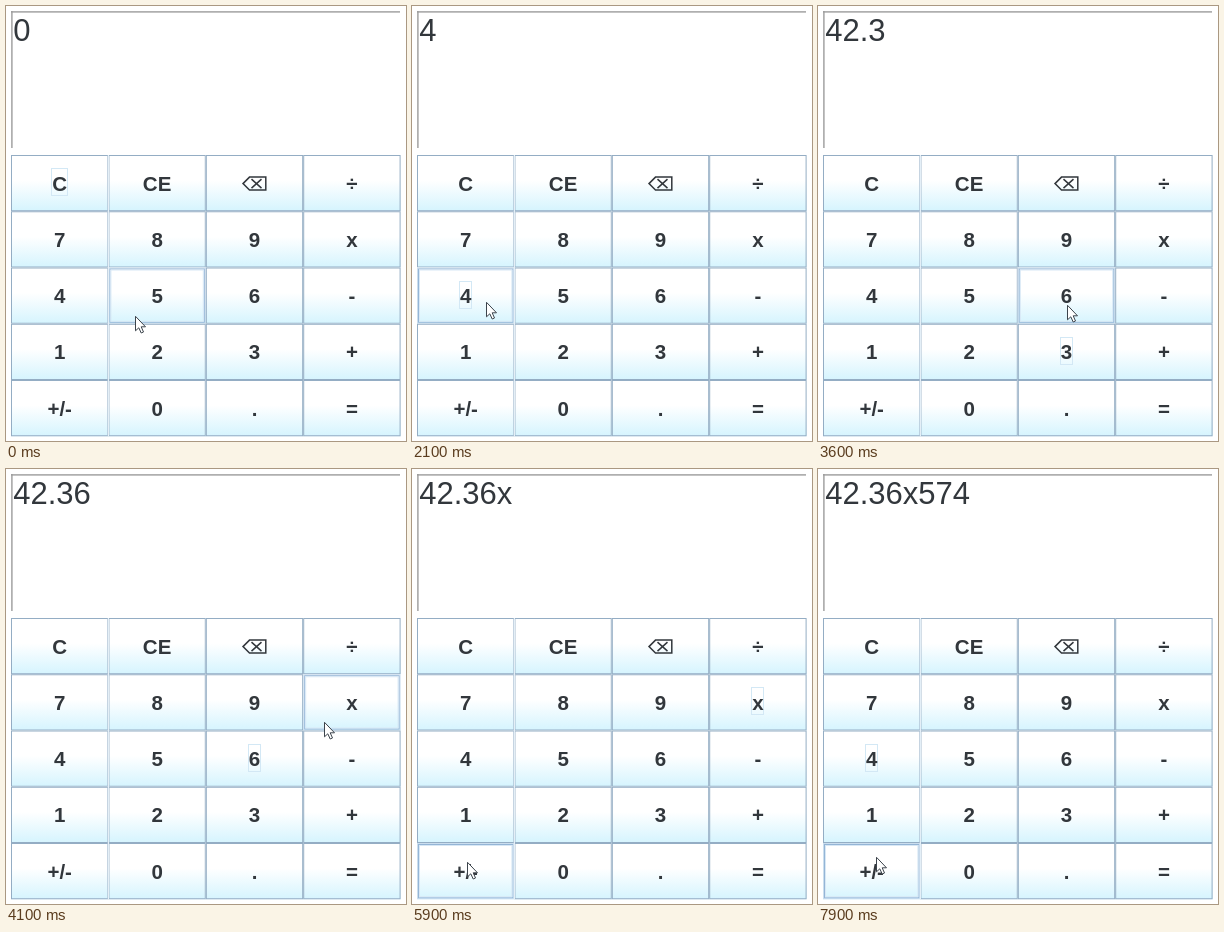
Write an HTML page with a canvas that moves like this. It is 400 px wide and 435 px high and loops after 8000 ms.

```html
<!DOCTYPE html>
<html lang="en">
<head>
<meta charset="utf-8">
<title>Calculator</title>
<style>
  html, body { margin: 0; width: 400px; height: 435px; overflow: hidden; background: #fff; }
  canvas { display: block; }
</style>
</head>
<body>
<canvas id="stage" width="400" height="435"></canvas>
<script>
const ctx = document.getElementById('stage').getContext('2d');
const LOOP = 8000, STEP = 100;
const SANS = '"Liberation Sans", Arial, sans-serif';
const INK = '#32373c';

// Button grid: four equal columns, five equal rows
const LEFT = 5, TOP = 149, W = 97.4, H = 56.25;
const KEYS = 'C CE ⌫ ÷ 7 8 9 x 4 5 6 - 1 2 3 + +/- 0 . ='.split(' ');
const buttons = KEYS.map((label, i) => ({
  label, x: LEFT + W * (i % 4), y: TOP + H * Math.floor(i / 4)
}));

// The pointer reaches a key, presses it one step later unless idle, then leaves
function visit(key, arrive, { stay = STEP, dx = 0, dy = 6, idle = false } = {}) {
  const b = buttons.find(b => b.label === key);
  return { key, arrive, leave: arrive + stay, press: idle ? Infinity : arrive + STEP,
           x: b.x + W / 2 + dx, y: b.y + H / 2 + dy };
}
const visits = [
  visit('5', 0, { stay: 1400, dx: -22, dy: 20, idle: true }),
  visit('4', 1800, { stay: 300, dx: 20 }),
  visit('2', 2400),
  visit('.', 2800),
  visit('3', 3100),
  visit('6', 3600, { dy: 9 }),
  visit('x', 4300, { stay: 800, dx: -4, dy: 3 }),
  visit('+/-', 5800, { stay: 200, dx: 1, dy: -9, idle: true }),
  visit('5', 6400, { stay: 200 }),
  visit('7', 7100, { dx: 14, dy: -9 }),
  visit('4', 7500, { dx: 8 }),
  visit('+/-', 7900, { dx: 4, dy: -14, idle: true })
];

function pointerAt(t) {
  const i = visits.findLastIndex(v => v.arrive <= t);
  const a = visits[i], b = visits[i + 1];
  if (!b || t <= a.leave) return [Math.round(a.x), Math.round(a.y)];
  const u = (t - a.leave) / (b.arrive - a.leave), k = u * u * (3 - 2 * u);
  return [Math.round(a.x + (b.x - a.x) * k), Math.round(a.y + (b.y - a.y) * k)];
}

function frame(x, y, w, h, color) {
  ctx.strokeStyle = color;
  ctx.lineWidth = 1;
  ctx.strokeRect(x + .5, y + .5, w - 1, h - 1);
}

function trace(points, x, y) {
  ctx.beginPath();
  points.forEach(([px, py]) => ctx.lineTo(x + px, y + py));
  ctx.closePath();
}

function drawDisplay(text) {
  ctx.fillStyle = '#9c9c9c';
  ctx.fillRect(5, 5.2, 389, 1.4);
  ctx.fillRect(5.2, 5, 1.4, 137);
  ctx.fillStyle = INK;
  ctx.font = '31px ' + SANS;
  ctx.textAlign = 'left';
  ctx.fillText(text, 7.2, 35);
}

function drawErase(cx, cy) {
  ctx.strokeStyle = INK;
  ctx.lineWidth = 1.5;
  trace([[-11.5, 0], [-5, -6.5], [11.3, -6.5], [11.3, 6.5], [-5, 6.5]], cx, cy);
  ctx.stroke();
  ctx.beginPath();
  for (const s of [-1, 1]) {
    ctx.moveTo(cx - 3, cy - 4.5 * s);
    ctx.lineTo(cx + 7, cy + 4.5 * s);
  }
  ctx.stroke();
}

function drawButton({ label, x, y }, hover, focus) {
  const fill = ctx.createLinearGradient(0, y, 0, y + H);
  fill.addColorStop(.45, '#fff');
  fill.addColorStop(1, '#d5f4fe');
  ctx.fillStyle = fill;
  ctx.fillRect(x, y, W, H);
  if (hover) {
    frame(x, y, W, H, '#cbdeee');
    frame(x + 1, y + 1, W - 2, H - 2, '#94b5d6');
    frame(x + 2, y + 2, W - 4, H - 4, '#d8e8f5');
  } else {
    frame(x, y, W, H, '#94adc4');
  }

  const cx = x + W / 2, base = y + 35.6;
  ctx.font = 'bold 20.5px ' + SANS;
  ctx.textAlign = 'center';
  if (focus) {
    const fw = Math.round(ctx.measureText(label).width) + 2;
    frame(Math.round(cx - fw / 2), Math.round(base - 22.5), fw, 28, '#d3e8f5');
  }
  if (label === '⌫') return drawErase(cx, base - 7);
  ctx.fillStyle = INK;
  ctx.fillText(label, cx, base);
}

function drawPointer(x, y) {
  trace([[0, 0], [0, 14.5], [3.3, 11.5], [5.7, 16.7], [8, 15.7], [5.7, 10.5], [10, 10.5]], x + .5, y + .3);
  ctx.fillStyle = '#fff';
  ctx.fill();
  ctx.strokeStyle = '#3c444c';
  ctx.lineWidth = 1;
  ctx.stroke();
}

function draw(t) {
  const typed = visits.filter(v => v.press <= t).map(v => v.key);
  const focus = typed.length ? typed[typed.length - 1] : 'C';
  const [px, py] = pointerAt(t);
  ctx.fillStyle = '#fff';
  ctx.fillRect(0, 0, 400, 435);
  drawDisplay(typed.join('') || '0');
  for (const b of buttons) {
    const hover = px >= b.x && px < b.x + W && py >= b.y && py < b.y + H;
    drawButton(b, hover, b.label === focus);
  }
  // Pale gap after the first column
  ctx.fillStyle = '#e4eff7';
  ctx.fillRect(LEFT + W - .6, TOP, 1.2, H * 5);
  drawPointer(px, py);
}

const start = performance.now();
function tick(now) {
  const t = Math.max(0, now - start) % LOOP;
  draw(Math.floor(t / STEP) * STEP);
  requestAnimationFrame(tick);
}
draw(0);
requestAnimationFrame(tick);
</script>
</body>
</html>
```
